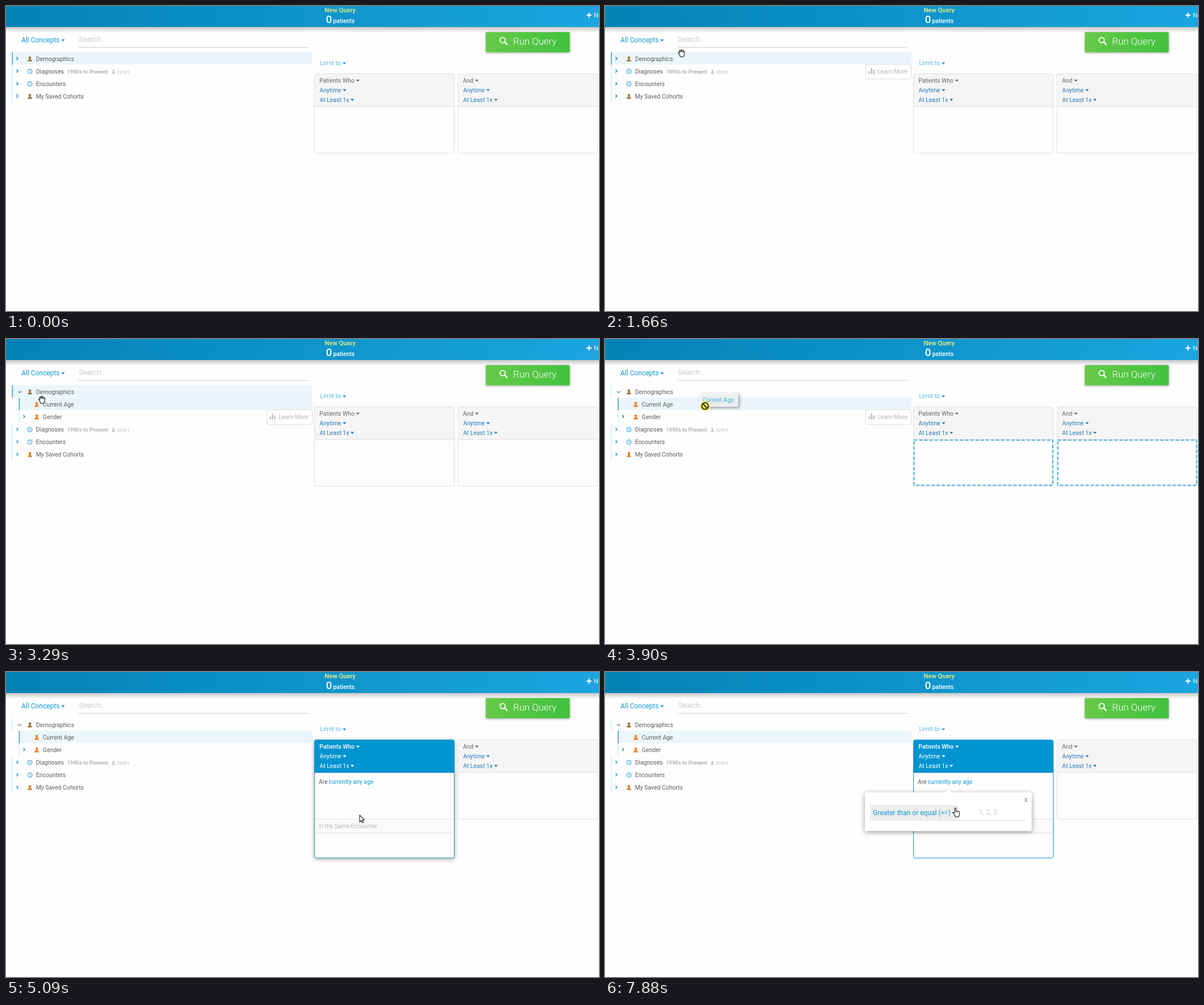
An HTML page with a canvas for the animation above (8000 ms loop, 1043 by 537 pixels).

```html
<!DOCTYPE html>
<html lang="en">
<head>
<meta charset="utf-8">
<title>Cohort query</title>
<style>
html, body { margin: 0; width: 100%; height: 100%; overflow: hidden; background: #fefefe; }
canvas { display: block; width: 1043px; height: 537px; }
</style>
</head>
<body>
<canvas id="stage"></canvas>
<script>
const W = 1043, H = 537, LOOP = 8000;
const EXPAND = 2590, DRAG = 3750, DROP = 4850, POPUP = 7015, LEAVE = 7810;
const BLUE = '#1299d3', LINK = '#2b7cb8', ORANGE = '#f0821e', BROWN = '#a1773c', INK = '#5c5c5c';

const canvas = document.getElementById('stage');
const dpr = window.devicePixelRatio || 1;
canvas.width = W * dpr;
canvas.height = H * dpr;
const c = canvas.getContext('2d');

// Pointer hot spot over time: [ms, x, y]
const route = [
  [120, 947, 499], [890, 368, 184], [960, 338, 168], [1060, 283, 143], [1350, 155, 82],
  [1580, 155, 82], [2150, 8, 91], [2360, 20, 83], [2420, 20, 83], [2500, 20, 88],
  [2800, 20, 88], [3440, 76, 113], [3750, 76, 113], [3900, 176, 118], [4550, 540, 190],
  [DROP, 622, 252], [6160, 622, 252], [6620, 616, 190], [7430, 616, 190], [7880, 616, 239]
];

const shapes = {
  arrow: [0, 0, 'M0 0V12l2.8-2.6 1.9 4.2 1.9-.9-1.9-4h3.9Z'],
  point: [-4, 0, 'M3.2 1.2C3.2-.2 5.4-.2 5.4 1.2V6q1-.8 2 .3 1.2-.6 2 .5 1.8-.4 2 1V11q0 2-1.2 3.2V16H4.4V14.6L1 10.6Q-.3 8.6 1 8 2 7.7 3.2 9.4Z'],
  open: [-6.5, -7, 'M3 9L1 6.5q0-1.5 1.6-.9l.8 1L2.4 3q.4-1.6 1.8-.6l1 2.2V1.4q.9-1.4 1.9 0v3.2L8 1.9q1.3-1 1.8.5L9.6 5.5l1-1.7q1.6-.6 1.7.9l-.9 4.8-1.4 3.8H4.8Z'],
  grab: [-6.5, -7, 'M3.4 9.6L1.6 8q-.3-1.6 1.5-1.5V5q.8-1.4 2.2-.5 1-1.1 2 0 1.2-.9 2.1.3 1.7-.5 2 1v3.6L10 13.3H4.8Z']
};

const clamp = v => Math.max(0, Math.min(1, v));

function pointerAt(t) {
  if (t < route[0][0]) return null;
  for (let i = 1; i < route.length; i++) {
    const [t0, x0, y0] = route[i - 1], [t1, x1, y1] = route[i];
    if (t < t1) {
      const k = (t - t0) / (t1 - t0);
      return { x: x0 + (x1 - x0) * k, y: y0 + (y1 - y0) * k };
    }
  }
  const [, x, y] = route[route.length - 1];
  return { x, y };
}

function text(s, x, y, size, color, weight = 400) {
  c.font = `${weight} ${size}px Roboto, sans-serif`;
  c.fillStyle = color;
  c.fillText(s, x, y);
  return x + c.measureText(s).width;
}

function rect(x, y, w, h, color) {
  c.fillStyle = color;
  c.fillRect(x, y, w, h);
}

function box(x, y, w, h, r, fill, stroke) {
  c.beginPath();
  c.roundRect(x, y, w, h, r);
  if (fill) { c.fillStyle = fill; c.fill(); }
  if (stroke) { c.strokeStyle = stroke; c.lineWidth = 1; c.stroke(); }
}

function line(points, color, width = 1) {
  c.beginPath();
  points.forEach(([x, y]) => c.lineTo(x, y));
  c.strokeStyle = color;
  c.lineWidth = width;
  c.stroke();
}

function shadow(blur, dy, alpha, draw, dx = 0) {
  c.save();
  c.shadowColor = `rgba(0,0,0,${alpha})`;
  c.shadowBlur = blur * dpr;
  c.shadowOffsetX = dx * dpr;
  c.shadowOffsetY = dy * dpr;
  draw();
  c.restore();
}

function ramp(x0, y0, x1, y1, from, to) {
  const g = c.createLinearGradient(x0, y0, x1, y1);
  g.addColorStop(0, from);
  g.addColorStop(1, to);
  return g;
}

function caret(x, y, color) {
  c.fillStyle = color;
  c.beginPath();
  c.moveTo(x, y);
  c.lineTo(x + 6.4, y);
  c.lineTo(x + 3.2, y + 3.6);
  c.fill();
}

function menu(s, x, y, size, color, weight) {
  caret(text(s, x, y, size, color, weight) + 2.6, y - 5, color);
}

function person(x, y, color, scale = 1) {
  c.save();
  c.translate(x, y);
  c.scale(scale, scale);
  c.fillStyle = color;
  c.beginPath();
  c.arc(0, -2, 2.3, 0, 7);
  c.fill();
  c.fill(new Path2D('M-1.2-1h2.4v2Q4 1.6 4 4.4H-4Q-4 1.6-1.2 1Z'));
  c.restore();
}

function clock(x, y) {
  c.beginPath();
  c.arc(x, y, 4, 0, 7);
  c.strokeStyle = BLUE;
  c.lineWidth = 1;
  c.stroke();
  line([[x, y - 2.5], [x, y + .3], [x + 2, y + 1.5]], BLUE, .9);
}

function header() {
  rect(0, 37, W, 10, ramp(0, 37, 0, 47, 'rgba(0,0,0,.22)', 'rgba(0,0,0,0)'));
  rect(0, 0, W, 37, ramp(0, 0, W, 37, '#0282b6', '#1ba5de'));
  text('New Query', 560.5, 10.6, 11.2, '#f2f178', 500);
  text('0', 562.7, 30, 18.6, '#fff', 500);
  text('patients', 575.4, 29.6, 10.4, '#fff', 500);
  rect(1021, 15, 9, 2, '#fff');
  rect(1024.5, 11.5, 2, 9, '#fff');
  text('New', 1034, 20.4, 11.2, '#e2f4fc');
}

function toolbar() {
  menu('All Concepts', 27, 63.8, 12, BLUE);
  text('Search...', 128.3, 63, 12.8, '#b4b4b4', 300);
  rect(127, 72.5, 405, 1, '#c8c8c8');
  shadow(4, 1, .35, () => box(844, 46, 147.5, 35.5, 1, ramp(844, 0, 991, 20, '#69cb49', '#42c23f')));
  c.beginPath();
  c.arc(873.6, 60, 4.6, 0, 7);
  c.strokeStyle = '#fff';
  c.lineWidth = 1.8;
  c.stroke();
  line([[877, 63.4], [882, 68.4]], '#fff', 2.2);
  text('Run Query', 892, 68, 16.8, '#fff', 300);
  menu('Limit to', 552.4, 104.4, 11.2, BLUE, 300);
}

function row(r, lit) {
  const { x, y, label, icon, arrow } = r;
  if (lit) rect(x, y - 11.5, 539 - x, 21.3, '#eaf6fb');
  rect(x - .5, y - 11.5, lit ? 1.5 : 1, 22, lit ? '#3b9dbb' : '#b5e3ee');
  if (arrow === 'right') line([[x + 7.5, y - 3.2], [x + 10, y - .5], [x + 7.5, y + 2.2]], '#1b7fae', 1.3);
  if (arrow === 'down') line([[x + 10, y - 1.2], [x + 13, y + 1.6], [x + 16, y - 1.2]], '#777', 1.2);
  if (icon === 'clock') clock(x + 31, y);
  else person(x + 31, y, icon);
  const end = text(label, x + 41.8, y + 3.8, 10.4, INK);
  if (r.since) {
    text(r.since, end + 5.6, y + 3.8, 9.5, '#a8a8a8', 500);
    person(189, y + .5, '#c6c9c4', .8);
    text(r.count, 194.7, y + 3.8, 8.1, '#b9b9b9');
  }
}

function learnMore(y) {
  box(458.5, y + 9.5, 80, 26, 3, '#fefefe', '#dcdcdc');
  [[463.6, 5], [467.6, 10], [471.6, 7]].forEach(([x, h]) => rect(x, y + 26.5 - h, 2.4, h, '#bdbdbd'));
  text('Learn More', 479.4, y + 25.6, 10.4, '#b8b8b8');
}

function tree(t, p) {
  const open = t >= EXPAND;
  const u = clamp((t - EXPAND) / 300);
  const shift = 44.4 * u * (2 - u) * (u < 1 ? .55 + .45 * u : 1);
  const roots = [
    { label: 'Demographics', icon: BROWN, arrow: open ? 'down' : 'right', y: 93 },
    { label: 'Diagnoses', icon: 'clock', arrow: 'right', y: 115 + shift, since: '1990s to Present', count: '32521' },
    { label: 'Encounters', icon: 'clock', arrow: 'right', y: 137 + shift },
    { label: 'My Saved Cohorts', icon: open ? '#d9822b' : BROWN, arrow: 'right', y: 159 + shift }
  ];
  const kids = [
    { label: 'Current Age', icon: ORANGE, y: 115 },
    { label: 'Gender', icon: ORANGE, arrow: 'right', y: 137 }
  ];
  roots.forEach(r => r.x = 11);
  kids.forEach(r => r.x = 23);
  const rows = open ? [roots[0], ...kids, ...roots.slice(1)] : roots;
  const picked = t < DRAG ? roots[0] : kids[0];
  let hovered = null;
  if (t >= DRAG && t < DROP) hovered = kids[0];
  else if (p && t < DRAG && p.x < 539) hovered = rows.find(r => p.y >= r.y - 11.5 && p.y < r.y + 10.6);

  roots.forEach(r => row(r, r === picked || r === hovered));
  if (open) {
    c.save();
    c.beginPath();
    c.rect(0, 103, 540, shift);
    c.clip();
    kids.forEach(r => row(r, r === picked || r === hovered));
    c.restore();
  }
  if (hovered) learnMore(hovered.y);
}

function panel(x, title, active, lifted) {
  const h = active ? 208 : 139.5;
  const edge = active ? BLUE : '#dedede';
  const base = () => box(x + .5, 119.5, 246, h, 3, '#fefefe', edge);
  if (lifted) shadow(7, 2, .3, base);
  else base();
  box(x + 1, 120, 245, 57, [2, 2, 0, 0], active ? '#0294d1' : '#f5f5f5');
  rect(x + 1, 176.5, 245, 1, active ? '#0b87bd' : '#dedede');
  menu(title, x + 9.3, 134.7, 10.4, active ? '#fff' : '#666', active ? 500 : 400);
  menu('Anytime', x + 9.6, 151.6, 10.4, active ? '#fff' : LINK);
  menu('At Least 1x', x + 9.6, 168.6, 10.4, active ? '#fff' : LINK);
}

function dropZone(x) {
  c.save();
  c.setLineDash([6, 3]);
  c.strokeStyle = '#45aeda';
  c.lineWidth = 2;
  c.strokeRect(x + 1.5, 178, 244, 79.5);
  c.restore();
}

function criteria(t, p) {
  const active = t >= DROP;
  panel(542, 'Patients Who', active, active && t < LEAVE);
  panel(794.5, 'And', false, false);
  if (t >= DRAG && !active) [542, 795].forEach(dropZone);
  if (!active) return;

  const hover = t > 6160 && t < LEAVE && p.y < 245;
  const onLink = hover && p.y < 202 || t > 7430 && t < LEAVE;
  if (hover) {
    rect(546, 184, 239, 19, '#eaf6fb');
    rect(545.5, 184, 1.5, 19, '#6cb5d0');
  }
  text('Are', 550, 197.3, 10.4, INK);
  if (onLink) box(567, 186, 79.8, 15.5, 3, '#1ca2d8');
  text('currently any age', 567.6, 197.3, onLink ? 10.3 : 10.4, onLink ? '#fff' : BLUE, onLink ? 500 : 400);
  rect(543, 258.5, 245, 25, '#fafafa');
  rect(543, 258.5, 245, 1, '#e2e2e2');
  rect(543, 283, 245, 1, '#e2e2e2');
  text('In the Same Encounter', 549.8, 274.6, 10.4, '#999', 300);
}

function popup(t) {
  const u = clamp((t - POPUP) / 300);
  if (!u) return;
  const k = u < .5 ? 2 * u * u : 1 - 2 * (1 - u) * (1 - u);
  c.save();
  c.globalAlpha = k;
  c.translate(0, -15 * (1 - k));
  shadow(9, 2, .4, () => box(457, 212, 293.5, 68, 2, '#fff'));
  c.fillStyle = '#fff';
  c.fill(new Path2D('M597 212.5L604 206l7 6.5Z'));
  line([[597, 212], [604, 205.8], [611, 212]], '#e8e8e8');
  text('x', 737.6, 229, 12, '#aaa', 700);
  box(467, 234, 154, 28, 2, '#eeeeee');
  menu('Greater than or equal (>=)', 471.3, 251.6, 12, BLUE);
  rect(622, 261, 118, 1, '#d4d4d4');
  text('1, 2, 3...', 657.5, 251.2, 12.8, '#b4b4b4', 300);
  c.restore();
}

function ghost(p) {
  c.save();
  c.globalAlpha = .85;
  shadow(5, 2, .45, () => box(p.x - 10, p.y - 23, 68.5, 24.5, 1, '#f9fcfe'), 2);
  text('Current Age', p.x - 4.3, p.y - 7.2, 10.4, '#35aadb');
  c.restore();
}

function halo(p) {
  c.fillStyle = 'rgba(255,240,60,.75)';
  c.beginPath();
  c.arc(p.x, p.y, 9, 0, 7);
  c.fill();
}

function noDrop(p) {
  c.beginPath();
  c.arc(p.x, p.y, 5.8, 0, 7);
  c.strokeStyle = '#2c2c14';
  c.lineWidth = 2;
  c.stroke();
  line([[p.x - 4, p.y - 4], [p.x + 4, p.y + 4]], '#2c2c14', 2);
}

function pointer(t, p) {
  const dragging = t >= DRAG && t < DROP;
  if (dragging) ghost(p);
  if (t >= 3610 && t < DROP) halo(p);
  if (dragging && p.x < 543) return noDrop(p);
  let kind = 'arrow';
  if (t >= 3530 && t < DRAG) kind = 'grab';
  else if (t < DRAG && p.y < 170) kind = p.x < 30 ? 'point' : 'open';
  else if (t > 6160 && (p.y < 202 || t > 7430)) kind = 'point';
  const [dx, dy, d] = shapes[kind];
  const path = new Path2D(d);
  c.save();
  c.translate(p.x + dx, p.y + dy);
  c.lineJoin = 'round';
  c.lineWidth = 1.1;
  c.fillStyle = '#fff';
  c.strokeStyle = '#1c1c1c';
  c.fill(path);
  c.stroke(path);
  if (kind === 'point') line([[7.4, 6.5], [7.4, 9]], '#1c1c1c', .8);
  c.restore();
}

function draw(t) {
  const p = pointerAt(t);
  c.setTransform(dpr, 0, 0, dpr, 0, 0);
  rect(0, 0, W, H, '#fefefe');
  header();
  toolbar();
  tree(t, p);
  criteria(t, p);
  popup(t);
  if (p) pointer(t, p);
}

let start;
function tick(now) {
  start ??= now;
  draw((now - start) % LOOP);
  requestAnimationFrame(tick);
}
requestAnimationFrame(tick);
</script>
</body>
</html>
```
